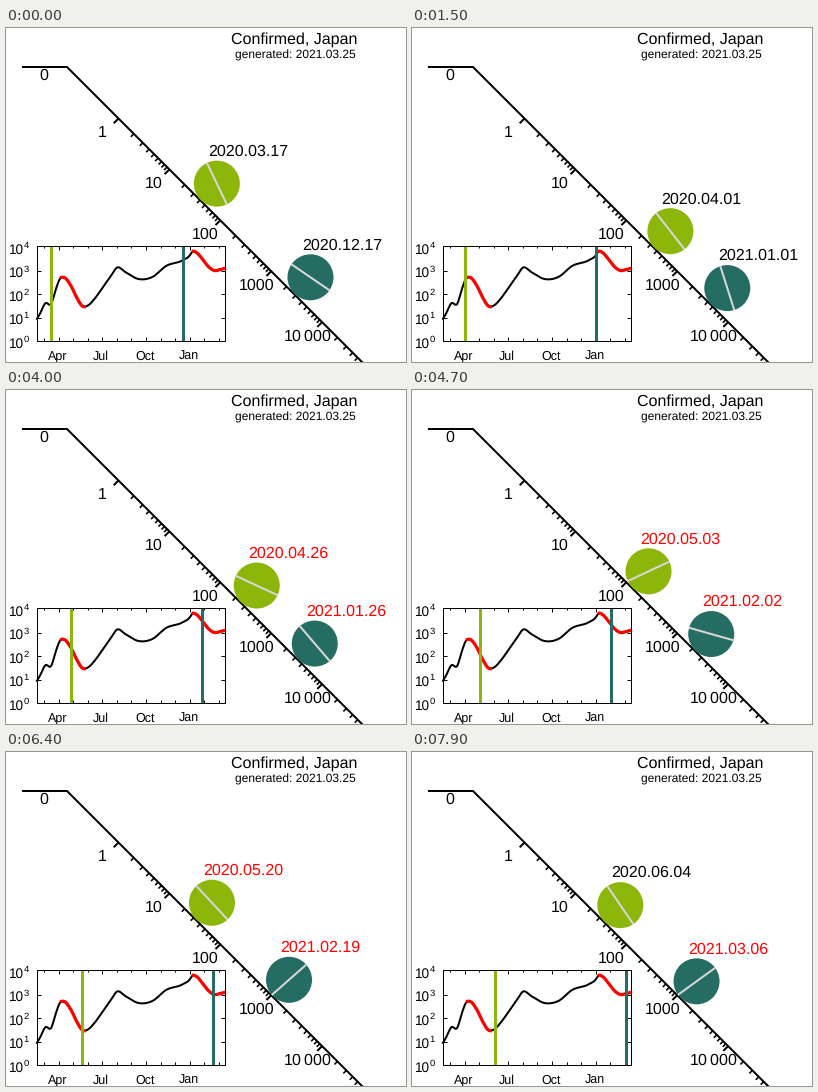
Animation of 400x334 px, one loop 8 s. Source, as a matplotlib script:

```python
import matplotlib.pyplot as plt
import numpy as np
from matplotlib.animation import FuncAnimation
from matplotlib.patches import Circle, Rectangle

W, H, DPI = 400, 334, 100
FRAMES, INTERVAL = 80, 100
PX = 72 / DPI
GREEN, TEAL, RED = "#8cb60a", "#256d62", "#ff0000"
START = np.datetime64("2020-03-17")
SHIFT = 275                               # days between the two balls
ALERTS = [(21, 69), (297, 400)]           # emergency periods, in days from START

# key points of the curve: day, log10 of the weekly mean
DAY, VALUE = np.transpose([
    (-32, .88), (-24, 1.16), (-13, 1.6), (0, 1.596), (9, 2.184), (18, 2.65), (27, 2.70),
    (40, 2.38), (54, 1.812), (64, 1.5), (79, 1.547), (89, 1.76), (106, 2.23),
    (125, 2.78), (137, 3.12), (155, 2.93), (182, 2.64), (212, 2.73), (240, 3.19),
    (275, 3.436), (290, 3.648), (295, 3.8), (303, 3.776), (315, 3.52), (329, 3.16),
    (341, 3.0), (354, 3.044), (365, 3.1)])
SLOPE = np.gradient(VALUE, DAY)

# slope: y = x - DROP
CORNER, DROP, UNIT, DECADE = 61, 22, 113, 50.9
RADIUS, LIFT = 23, 16.6
# inset chart
LEFT, RIGHT, TOP, BOTTOM = 30.5, 218.5, 217.5, 312.5
DAY_W, DAY0 = 0.4775, 45.4

plt.rcParams["font.family"] = "Liberation Sans"
plt.rcParams["mathtext.default"] = "regular"
plt.rcParams["text.hinting"] = "no_hinting"

fig = plt.figure(figsize=(W / DPI, H / DPI), dpi=DPI, facecolor="white")
ax = fig.add_axes([0, 0, 1, 1])
ax.set(xlim=(0, W), ylim=(H, 0))
ax.axis("off")


def text(x, y, s, size=16, ha="center", **kw):
    return ax.text(x, y, s, fontsize=size * PX, ha=ha, va="baseline", **kw)


def line(x, y, width=1.0, color="black", cap="butt", **kw):
    return ax.plot(x, y, color=color, lw=width * PX, solid_capstyle=cap, **kw)[0]


def level(day):
    """Cubic Hermite curve through the key points."""
    i = np.clip(np.searchsorted(DAY, day, "right") - 1, 0, len(DAY) - 2)
    h = DAY[i + 1] - DAY[i]
    t = (day - DAY[i]) / h
    ease = t * t * (3 - 2 * t)
    bend = t * (1 - t) * ((1 - t) * SLOPE[i] - t * SLOPE[i + 1])
    return VALUE[i] + (VALUE[i + 1] - VALUE[i]) * ease + h * bend


def chart_x(day):
    return DAY0 + DAY_W * day


def chart_y(value):
    return 313 - 23.5 * value


def draw_slope():
    line([16, CORNER, 370], [39, 39, 370 - DROP], 2, solid_joinstyle="miter")
    text(38, 52, "0")
    for k, label in enumerate(["1", "10", "100", "1000", r"$10\,000$"]):
        text(96.7 + 51.2 * k, 109 + 51 * k, label)
        for m in range(1, 10):
            x = UNIT - 0.5 + DECADE * (k + np.log10(m))
            size, width = (4.8, 2) if m == 1 else (3, 1.6)
            line([x, x - size], [x - DROP, x - DROP + size], width)


def draw_chart():
    days = np.arange((LEFT - DAY0) / DAY_W, (RIGHT - DAY0) / DAY_W, 0.5)
    x, y = chart_x(days), chart_y(level(days))
    line(x, y, 2)
    for a, b in ALERTS:
        on = (days >= a) & (days <= b)
        line(x[on], y[on], 3.2, RED, "projecting")
    ax.add_patch(Rectangle((LEFT, TOP), RIGHT - LEFT, BOTTOM - TOP, fill=False,
                           lw=PX, ec="black", zorder=4))
    for k in range(5):
        tick = chart_y(k)
        text(2.7, tick + 6.5, "10", 13.5, "left")
        text(17.7, tick + 1, str(k), 9.5, "left")
        if 0 < k < 4:
            line([LEFT, LEFT + 4], [tick, tick])
            line([RIGHT - 4, RIGHT], [tick, tick])
    names = {0: "Apr", 3: "Jul", 6: "Oct", 9: "Jan"}
    for month in range(-1, 12):
        x = chart_x(15 + 30.5 * month)
        size = 4 if month % 3 == 0 else 2.5
        line([x, x], [BOTTOM - size, BOTTOM])
        line([x, x], [TOP, TOP + size])
        if month in names:
            text(x - 1.2, 332, names[month], 12.5)


class Ball:
    def __init__(self, color, shift):
        self.shift = shift
        self.disc = ax.add_patch(Circle((0, 0), RADIUS, fc=color, lw=0, zorder=5))
        self.spoke = line([], [], 2, "#d8d8d8", zorder=6)
        self.label = text(0, 0, "", zorder=7)
        self.bar = line([], [], 3, color, zorder=3)

    def update(self, n):
        day = n + self.shift
        foot = UNIT + DECADE * level(day)
        cx, cy = foot + LIFT, foot - DROP - LIFT
        self.disc.center = cx, cy
        # rolls without slipping from the corner
        turn = -np.pi / 4 + np.sqrt(2) * (foot - CORNER) / RADIUS
        dx, dy = RADIUS * np.cos(turn), RADIUS * np.sin(turn)
        self.spoke.set_data([cx - dx, cx + dx], [cy - dy, cy + dy])
        self.label.set_position((cx + 31.3, cy - 27.8))
        self.label.set_text(str(START + day).replace("-", "."))
        alert = any(a <= day <= b for a, b in ALERTS)
        self.label.set_color(RED if alert else "black")
        x = chart_x(day)
        self.bar.set_data([x, x], [TOP, BOTTOM])
        return self.disc, self.spoke, self.label, self.bar


text(288.5, 16, "Confirmed, Japan")
text(289, 31, "generated: 2021.03.25", 12)
draw_slope()
draw_chart()
balls = [Ball(GREEN, 0), Ball(TEAL, SHIFT)]


def update(n):
    return [part for ball in balls for part in ball.update(int(n))]


anim = FuncAnimation(fig, update, frames=FRAMES, interval=INTERVAL,
                     repeat=True, repeat_delay=0, blit=False)
plt.show()
```
